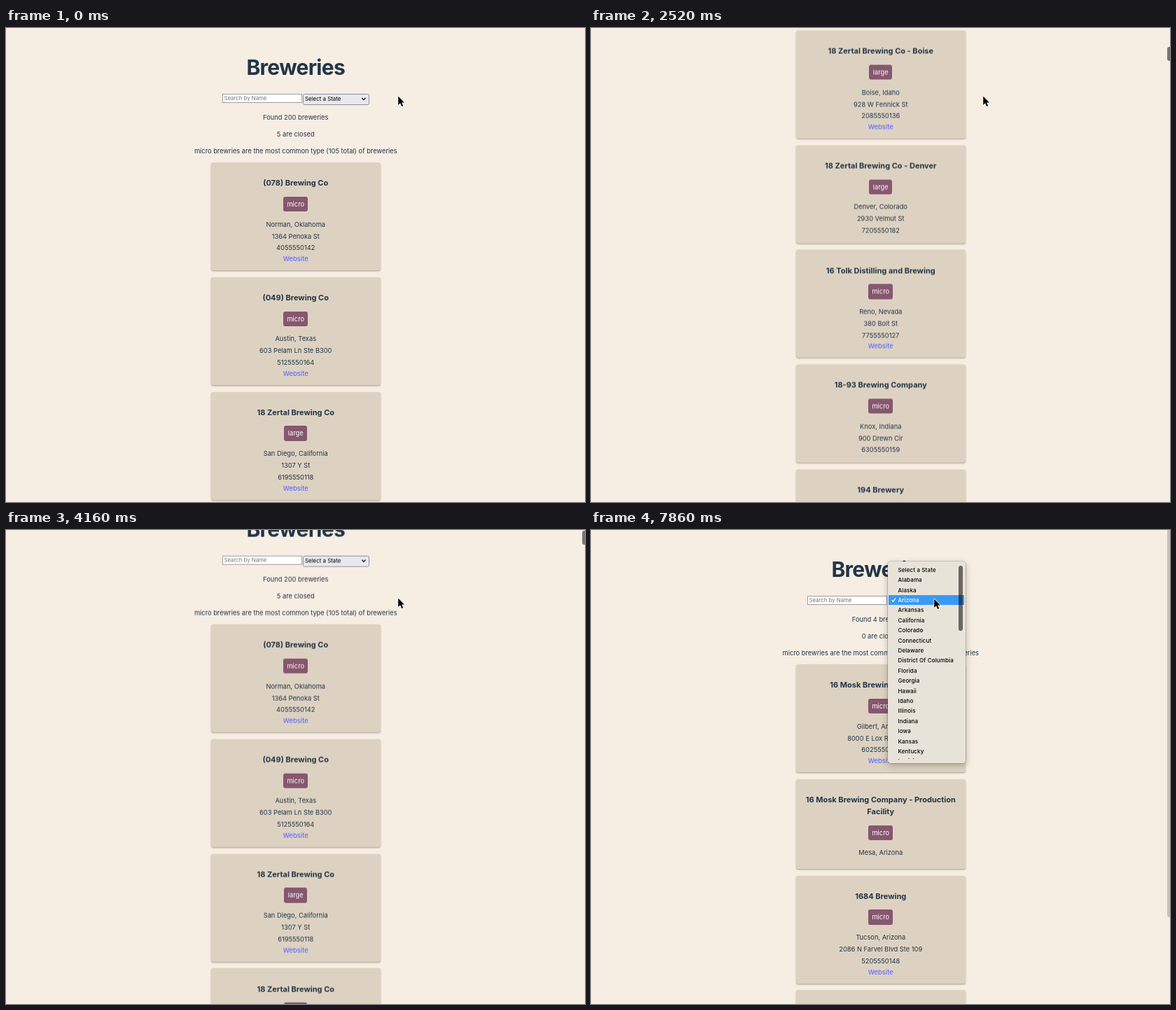
An HTML page for the animation above (8 s loop, 827 px wide and 677 px high).

```html
<!DOCTYPE html>
<html lang="en">
<head>
<meta charset="utf-8">
<title>Breweries</title>
<style>
  html, body { margin: 0; width: 100%; height: 100%; overflow: hidden; background: #f6ede3; }
  body { position: relative; color: #213547; font: 9.3px/16px Inter, "Open Sans", sans-serif; font-optical-sizing: none; }
  #stage { position: absolute; left: 0; top: 0; width: 827px; height: 677px; overflow: hidden; background: #f6ede3; }
  #stage div, #stage svg { position: absolute; }
  #page { left: 0; top: 0; width: 827.5px; will-change: transform; }
  .line { left: 0; width: 100%; height: 16px; text-align: center; white-space: nowrap; }
  .h1 { font-size: 30px; font-weight: 700; letter-spacing: -.7px; }
  .h3 { font-size: 11px; font-weight: 700; }
  .link { color: #646cff; font-weight: 500; }
  .card { left: 293px; width: 241.5px; border-radius: 3px; background: #ddd2c1; box-shadow: 0 1.2px 2px rgba(60, 45, 30, .38); }
  .badge { height: 21.4px; line-height: 21.4px; }
  .badge span { display: inline-block; padding: 0 5.3px; border-radius: 3px; background: #87566f; color: #fff; }
  #search { left: 309px; top: 94px; width: 114px; height: 13px; box-sizing: border-box; border: .8px solid #a09da0; background: #fff; color: #757575; font-size: 7.8px; line-height: 11.8px; padding-left: 1.5px; }
  #select { left: 423.5px; top: 93.5px; width: 95px; height: 16.5px; box-sizing: border-box; border: 1px solid #8f8f9d; border-radius: 2.5px; color: #000; font-size: 7.9px; line-height: 12.5px; padding-left: 2.5px; }
  #select svg { right: 3px; top: 3px; }
  #menu { left: 423.5px; width: 111px; height: 288.5px; border-radius: 4px; background: #e8e3d9; box-shadow: 0 0 0 .6px rgba(0, 0, 0, .28), 0 3px 10px rgba(60, 45, 30, .32); color: #000; font-size: 8px; font-weight: 500; letter-spacing: .12px; }
  #rows { left: 0; top: 5px; width: 111px; height: 278.4px; overflow: hidden; }
  .row { left: 1px; width: 108px; height: 14.4px; line-height: 14.4px; box-sizing: border-box; padding-left: 14px; white-space: nowrap; }
  .hot { background: #389af6; color: #fff; }
  .row svg { left: 4px; top: 3.5px; }
  #grip { left: 101px; top: 6px; width: 6px; height: 93px; border-radius: 3px; background: rgba(0, 0, 0, .55); }
  #bar { left: 822.7px; width: 6px; border-radius: 3px; background: rgba(0, 0, 0, .51); }
  #pointer { left: 0; top: 0; overflow: visible; }
</style>
</head>
<body>
<div id="stage">
  <div id="page">
    <div id="search">Search by Name</div>
    <div id="select"><span></span>
      <svg width="8" height="7" viewBox="0 0 8 7"><path d="M1.5 2 4 4.6 6.5 2" fill="none" stroke="#000" stroke-width="1.2"/></svg>
    </div>
  </div>
  <div id="bar"></div>
  <div id="menu"><div id="rows"></div><div id="grip"></div></div>
  <svg id="pointer" width="20" height="20">
    <g id="ring" fill="none">
      <circle cx="1.3" cy="0" r="8.3" stroke="#fff" stroke-width="2.6" opacity=".7"/>
      <circle cx="1.3" cy="0" r="8.1" stroke="#111" stroke-width="1.3"/>
    </g>
    <path d="M.2.4V13L3.1 10.3 5.1 15 7.2 14.1 5.2 9.5H9Z" stroke="#fff" stroke-width="1.5" stroke-linejoin="round" paint-order="stroke"/>
  </svg>
</div>
<script>
const $ = id => document.getElementById(id);
const GAP = 9.7, ROW = 14.4, STEP = 148.3, DEPTH = 1306.5;

// title, type, city, street, phone, has a link
const co = '18 Zertal Brewing Co';
const allCards = [
  ['(078) Brewing Co', 'micro', 'Norman, Oklahoma', '1364 Penoka St', '4055550142', 1],
  ['(049) Brewing Co', 'micro', 'Austin, Texas', '603 Pelam Ln Ste B300', '5125550164', 1],
  [co, 'large', 'San Diego, California', '1307 Y St', '6195550118', 1],
  [co, 'large', 'Bend, Oregon', '68940 37th St', '5415550173', 1],
  [co, 'large', 'Bend, Oregon', '1413 NW Hartelson Ave Ste D', '5415550173', 0],
  [co, 'large', 'Portland, Oregon', '1620 NW Pelders St', '5035550169', 1],
  [co + ' - Bend Pub', 'large', 'Bend, Oregon', '62900 Orvel Rd', '5415550121', 0],
  [co + ' - Boise', 'large', 'Boise, Idaho', '928 W Fennick St', '2085550136', 1],
  [co + ' - Denver', 'large', 'Denver, Colorado', '2930 Velmut St', '7205550182', 0],
  ['16 Tolk Distilling and Brewing', 'micro', 'Reno, Nevada', '380 Bolt St', '7755550127', 1],
  ['18-93 Brewing Company', 'micro', 'Knox, Indiana', '900 Drewn Cir', '6305550159', 0],
  ['194 Brewery', 'brewpub', 'Quilcene, Washington', '294 Ferlin Rd', '3605550176', 1]
];
const arizonaCards = [
  ['16 Mosk Brewing Company', 'micro', 'Gilbert, Arizona', '8000 E Lox Rd Bldg 4', '6025550195', 1],
  ['16 Mosk Brewing Company - Production|Facility', 'micro', 'Mesa, Arizona', '', '', 0],
  ['1684 Brewing', 'micro', 'Tucson, Arizona', '2086 N Farvel Blvd Ste 109', '5205550148', 1],
  ['1750 Ale Works', 'micro', 'Phoenix, Arizona', '410 N Selder Ave', '6025550133', 1]
];
const states = ['Select a State', 'Alabama', 'Alaska', 'Arizona', 'Arkansas', 'California', 'Colorado',
  'Connecticut', 'Delaware', 'District Of Columbia', 'Florida', 'Georgia', 'Hawaii', 'Idaho', 'Illinois',
  'Indiana', 'Iowa', 'Kansas', 'Kentucky', 'Louisiana'];

function add(parent, cls, top, html = '') {
  const el = document.createElement('div');
  el.className = cls;
  el.style.top = top + 'px';
  el.innerHTML = html;
  parent.append(el);
  return el;
}
const line = (parent, y, text, cls = '') => add(parent, 'line ' + cls, y - 8, text);

function addCard(list, top, [title, type, city, street, phone, link]) {
  const card = add(list, 'card', top);
  const parts = title.split('|');
  const dy = (parts.length - 1) * 17;
  parts.forEach((part, i) => line(card, 29.4 + i * 17, part, 'h3'));
  add(card, 'line badge', 48.8 + dy, `<span>${type}</span>`);
  line(card, 88.7 + dy, city);
  line(card, 105.5 + dy, street);
  line(card, 122.4 + dy, phone);
  if (link) line(card, 138, 'Website', 'link');
  const height = link ? 154.1 : phone ? 139.8 : 128;
  card.style.height = height + 'px';
  return top + height + GAP;
}

function addList(found, closed, common, cards) {
  const list = add($('page'), 'line', 0);
  line(list, 127.7, `Found ${found} breweries`);
  line(list, 151.8, `${closed} are closed`);
  line(list, 175.8, `micro brewries are the most common type (${common} total) of breweries`);
  cards.reduce((top, card) => addCard(list, top, card), 192);
  return list;
}

line($('page'), 55.5, 'Breweries', 'h1');
const lists = [addList(200, 5, 105, allCards), addList(4, 0, 4, arizonaCards)];
const tick = '<svg width="7" height="8" viewBox="0 0 7 8"><path d="M.8 4.2 2.6 6.4 6 1.2" fill="none" stroke="currentColor" stroke-width="1.2"/></svg>';
const rows = states.map((name, i) => add($('rows'), 'row', i * ROW, name + tick));

// progress from a to b, blended between linear and smooth
function ease(k, a, b, blend = 1) {
  const x = Math.min(1, Math.max(0, (k - a) / (b - a)));
  return x + blend * (x * x * (3 - 2 * x) - x);
}

const moves = [[28, 31, -70, 6], [39, 42, -9, 35], [46, 49, 9, -40]];
function pointerAt(k) {
  return moves.reduce(([x, y], [a, b, dx, dy]) => {
    const p = ease(k, a, b);
    return [x + dx * p, y + dy * p];
  }, [560, 97]);
}

function draw(time) {
  const k = Math.min(53, Math.floor((time % 8000 + 12) / STEP));
  const scroll = DEPTH * (ease(k, 5, 17, .827) - ease(k, 18, 29, .695));
  const chosen = k >= 45 ? 3 : 0;
  const [x, y] = pointerAt(k);

  $('page').style.transform = `translateY(${-scroll}px)`;
  lists.forEach((list, i) => list.style.display = (i === 1) === (k >= 45) ? '' : 'none');

  $('pointer').style.transform = `translate(${x}px, ${y}px)`;
  $('ring').style.display = [3, 33, 43, 52].includes(k) ? '' : 'none';

  const hover = k === 31 || k === 32 || k === 44 || k >= 48;
  $('select').style.background = hover ? '#d0d0d7' : '#e9e9ed';
  $('select').firstChild.textContent = states[chosen];

  const open = k >= 33 && k < 44 || k >= 52;
  const top = 88 - chosen * ROW;
  const hot = Math.floor((y - top - 5) / ROW);
  $('menu').style.display = open ? '' : 'none';
  $('menu').style.top = top + 'px';
  rows.forEach((row, i) => {
    row.classList.toggle('hot', i === hot);
    row.lastChild.style.display = i === chosen ? '' : 'none';
  });

  const bar = $('bar').style;
  bar.top = scroll * .0212 - .7 + 'px';
  bar.height = (chosen ? 553.5 : 20.5) + 'px';
  bar.opacity = k < 6 ? 0 : chosen ? 1 - .64 * ease(k, 51, 53, 0) : 1 - ease(k, 33, 37, 0);
}

function loop() {
  draw(performance.now());
  requestAnimationFrame(loop);
}
loop();
</script>
</body>
</html>
```
